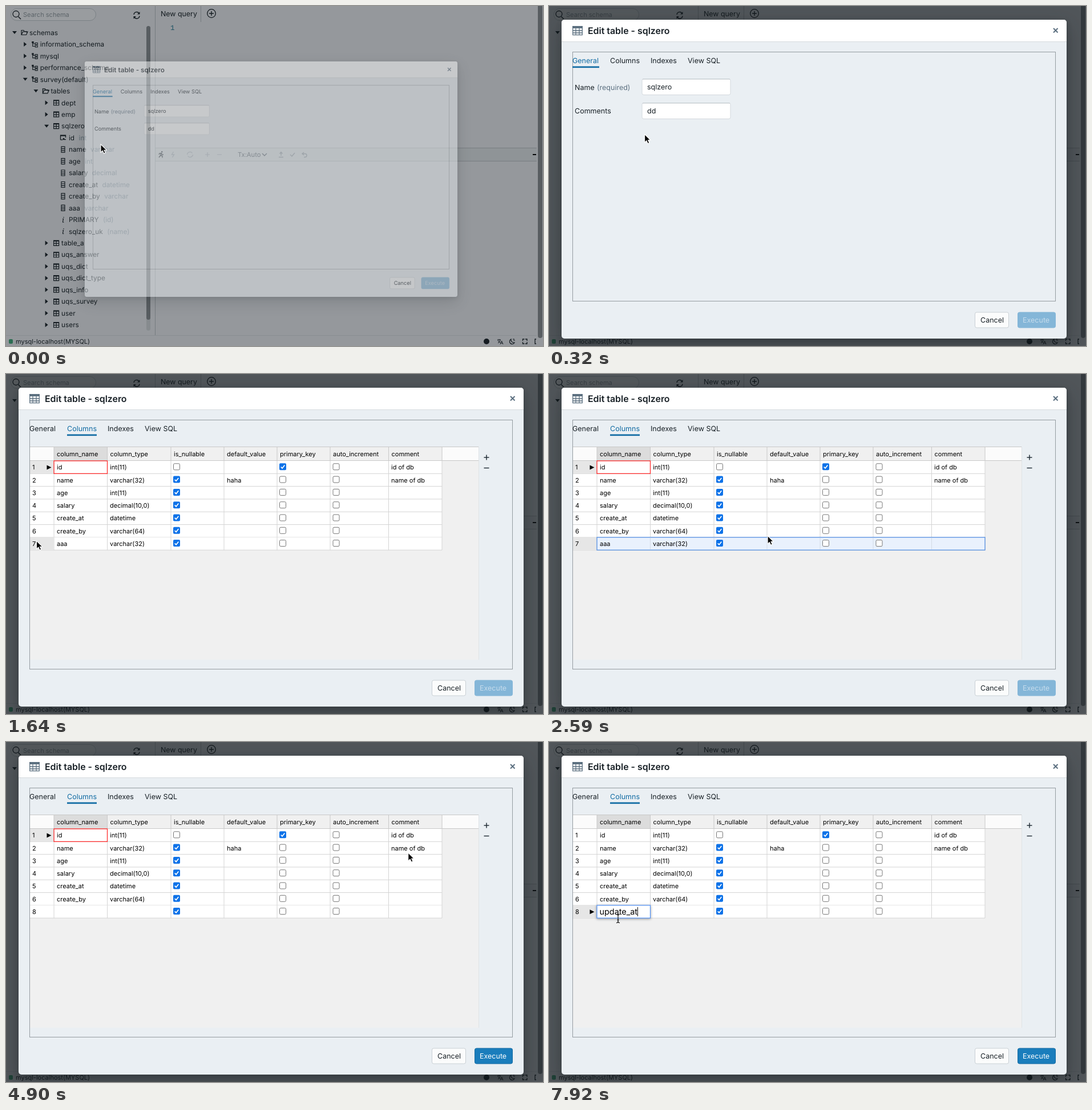
Write an HTML page that moves like this. It is 941 px wide and 595 px high and loops after 8 s.

```html
<!DOCTYPE html>
<html lang="en">
<head>
<meta charset="utf-8">
<title>Edit table</title>
<style>
html, body { margin: 0; width: 100%; height: 100%; overflow: hidden; background: #edf0f2; }
svg { display: block; width: 100vw; height: 100vh; }
text { font-family: Inter, "Open Sans", sans-serif; white-space: pre; text-rendering: geometricPrecision; }
#panel { filter: drop-shadow(0 3px 4px #10161a40) drop-shadow(0 12px 18px #10161a50); }
#editor rect { filter: drop-shadow(0 1px 2px #0006); }
</style>
</head>
<body>
<svg id="stage" viewBox="0 0 941 595" preserveAspectRatio="none"></svg>
<script>
const INK = '#182026', GREY = '#5c7080', BLUE = '#106ba3';

const text = (x, y, s, size = 12.5, fill = INK, more = '') =>
  `<text x="${x}" y="${y + size * 0.36}" font-size="${size}" fill="${fill}" ${more}>${s}</text>`;
const rect = (x, y, w, h, fill, more = '') =>
  `<rect x="${x}" y="${y}" width="${w}" height="${h}" fill="${fill}" ${more}/>`;
const line = (d, stroke = INK, width = 1, more = '') =>
  `<path d="${d}" fill="none" stroke="${stroke}" stroke-width="${width}" ${more}/>`;
const shape = (d, fill = INK) => `<path d="${d}" fill="${fill}"/>`;
const group = (id, body) => `<g id="${id}">${body}</g>`;

// ---- page behind the dialog ----
const icons = {
  folder: (x, y) => line(`M${x - 5} ${y + 4}V${y - 4}h4l1 2h4v2M${x - 5} ${y + 4}l2.500-5.500h8.500l-2.500 5.500z`, INK, 1.2),
  schema: (x, y) => line(`M${x - 4} ${y - 4}V${y + 3.5}H${x}M${x - 4} ${y - 1}H${x}`, INK, 1.1) +
    rect(x - 5.5, y - 5, 3.5, 3, INK) +
    [-2.5, 2].map(d => line(`M${x + 0.5} ${y + d}h4v3h-4z`, INK, 1.1)).join(''),
  table: (x, y) => line(`M${x - 4.5} ${y - 4.5}h9v9h-9zM${x - 4.5} ${y - 3.5}h9M${x - 4.5} ${y + 0.5}h9M${x} ${y - 4}v8`, INK, 1.2),
  key: (x, y) => line(`M${x - 4.5} ${y + 3.5}v-8h9v4M${x - 4.5} ${y - 3.5}h9M${x - 4.5} ${y + 3.5}h4M${x + 1} ${y + 3}h4`, INK, 1.3) +
    `<circle cx="${x + 1}" cy="${y + 2}" r="1.600" fill="${INK}"/>`,
  column: (x, y) => line(`M${x - 3} ${y - 5}h6v10h-6zM${x - 3} ${y - 1.5}h6M${x - 3} ${y + 1.8}h6`, INK, 1.2),
  index: (x, y) => text(x - 2, y, 'i', 13, INK, 'style="font-family:Noto Serif,serif" font-style="italic"')
};

function tree() {
  // level, icon, open, label, type
  const fold = (level, icon, names) => names.split(' ').map(n => [level, icon, false, n]);
  const col = (name, type, icon = 'column') => [4, icon, null, name, type];
  const rows = [
    [0, 'folder', true, 'schemas'],
    ...fold(1, 'schema', 'information_schema mysql performance_schema'),
    [1, 'schema', true, 'survey(default)'],
    [2, 'folder', true, 'tables'],
    ...fold(3, 'table', 'dept emp'),
    [3, 'table', true, 'sqlzero'],
    col('id', 'int', 'key'), col('name', 'varchar'), col('age', 'int'), col('salary', 'decimal'),
    col('create_at', 'datetime'), col('create_by', 'varchar'), col('aaa', 'varchar'),
    col('PRIMARY', '(id)', 'index'), col('sqlzero_uk', '(name)', 'index'),
    ...fold(3, 'table', 'table_a uqs_answer uqs_dict uqs_dict_type uqs_info uqs_survey user users')
  ];
  return rows.map(([level, icon, open, label, type], i) => {
    const y = 46.5 + 20.46 * i, x = 15 + 18.7 * level;
    const caret = open === null ? '' : open
      ? shape(`M${x - 4} ${y - 2.5}h8l-4 5z`)
      : shape(`M${x - 2.5} ${y - 4}v8l5-4z`);
    const tail = type ? `<tspan dx="7.500" fill="#8a9ba8">${type}</tspan>` : '';
    return caret + icons[icon](level === 4 ? 100 : x + 17, y) +
      text(level === 4 ? 110 : x + 26, y, label + tail, 11.8);
  }).join('');
}

const page =
  rect(0, 0, 941, 595, '#edf0f2') +
  rect(8.5, 4.5, 149, 21, '#f4f6f7', 'rx="10.500" stroke="#c2c9ce"') +
  line('M21.500 18.500l4.500 4.500', INK, 1.5) + `<circle cx="17.500" cy="14" r="5.500" fill="none" stroke="${INK}" stroke-width="1.300"/>` +
  text(30, 15, 'Search schema', 11.05, '#8f989e') +
  line('M224 15a5 5 0 0 1 9-2.500M234 17.500a5 5 0 0 1-9 2.500', INK, 1.4) +
  shape('M234.500 10v4.500h-4.500zM223.500 22.500v-4.500h4.500z') +
  tree() +
  rect(246, 35, 7, 533, '#d5d9dc', 'rx="3.500"') + rect(246, 35, 7, 514, '#888d90', 'rx="3.500"') +
  line('M261.500 0V576M341.500 0V28', '#b9bfc3') +
  text(271, 13.5, 'New query', 12.4) +
  `<circle cx="360" cy="13" r="7.300" fill="none" stroke="${INK}" stroke-width="1.300"/>` + line('M356 13h8M360 9v8', INK, 1.4) +
  text(288, 37.5, '1', 12.5, '#237893', 'style="font-family:Liberation Mono,monospace"') +
  rect(262, 248, 668, 23, '#e4e8eb') + line('M262 248.500H930M262 271.500H930', '#bdc3c7') +
  line('M923 260h6', '#000', 2) +
  line('M268 265l3-4 3 1.500v3M271 261l1-3.500-3 .500-1 2M272 258l2 2h2', INK, 1.4) + rect(272, 254, 2.5, 2.5, INK, 'rx="1"') +
  line('M293.500 255l-3 5h4l-3 5', '#a7b0b6', 1.4) +
  line('M317.500 260a5 5 0 0 1 9-2.500M327.500 260a5 5 0 0 1-9 2.500M349 260h8M353 256v8M370 260h8', '#a7b0b6', 1.2) +
  text(406, 260, 'Tx:Auto', 11.2, '#39444c') + line('M449 258l4 4 4-4', '#39444c', 1.4) +
  line('M478 264.500h8M482 262v-6M479.500 258.500l2.500-3 2.500 3M498 260l3 3 5-6M522 256l-3 2.500 3 2.500M519 258.500h5a3 3 0 0 1 0 6h-2', '#8a959c', 1.4) +
  rect(932, -6, 8, 587, '#888d90', 'rx="4"') +
  line('M0 576.500H930', '#d8dde0') +
  rect(5, 583, 7, 8, '#3fa878', 'rx="2"') + text(17, 587, 'mysql-localhost(MYSQL)', 11) +
  `<circle cx="842" cy="587" r="5" fill="${INK}"/>` +
  line('M861 584h6M864 583v1M862 590q4-2 4-6M862 585q1 3 4 4M866 592l2.500-6 2.500 6M867 590h3', INK, 1) +
  line('M885 583a4.500 4.500 0 1 0 6 6a5 5 0 0 1-6-6zM888 583h3M889 585h3', INK, 1.2) +
  line('M905.500 586v-3h3M910 583h3v3M913 588v3h-3M908.500 591h-3v-3M929 583h-2v8h2', INK, 1.3);

// ---- table grid ----
const EDGES = [42, 84, 177.5, 289, 382, 475, 568, 670.5, 764];
const TOP = 152, PITCH = 22.3;
const rowTop = i => TOP + PITCH * i;

function checkbox(x, y, on) {
  return on
    ? rect(x - 6, y - 6, 12, 12, '#0d72e8', 'rx="2"') + line(`M${x - 3.3} ${y + 0.2}l2.400 2.500 4.200-5.400`, '#fff', 1.7)
    : rect(x - 5.5, y - 5.5, 11, 11, '#fff', 'rx="2" stroke="#767676"');
}
function cells(i, num, name, type, nullable, value, key, comment) {
  const y = rowTop(i) + 11.3;
  const words = [[46, num], [89, name], [182, type], [387, value], [675, comment]];
  return words.map(([x, s]) => s ? text(x, y, s, 11, '#000') : '').join('') +
    checkbox(299, y - 1, nullable) + checkbox(485, y - 1, key) + checkbox(578.5, y - 1, false);
}
const backdrop = (i, n) => {
  const y = rowTop(i), h = PITCH * n;
  let d = '';
  for (let k = 1; k <= n; k++) d += `M42 ${y + PITCH * k}H764`;
  for (const x of EDGES.slice(1)) d += `M${x} ${y}v${h}`;
  return rect(42, y, 722, h, '#fff') + line(d, '#d4d4d4');
};
const head = i => rect(42, rowTop(i), 41.5, PITCH - 0.5, '#e6e6e6');
const marker = i => head(i) + shape(`M71.500 ${rowTop(i) + 7.5}v8l8-4z`, '#000');
const frame = (i, w, stroke, fill = 'none') =>
  rect(84, rowTop(i), w, PITCH, fill, `stroke="${stroke}" stroke-width="1.200"`);

const titles = ['column_name', 'column_type', 'is_nullable', 'default_value', 'primary_key', 'auto_increment', 'comment'];
const grid =
  rect(42, 127, 786, 373, '#f0f0f0') + line('M828.500 127V500', '#dfe3e6') +
  rect(42, 128, 786, 23.5, '#fbfbfb') + rect(84, 128, 680, 23.5, '#f0f0f0') + rect(84, 128, 93.5, 23.5, '#dcdcdc') +
  line('M42 127.500H828M42 151.500H828' + EDGES.slice(1).map(x => `M${x} 128v23`).join(''), '#c8c8c8') +
  titles.map((s, i) => text(EDGES[i + 1] + 5, 140, s, 11, '#000')).join('') +
  backdrop(0, 6) + group('last', backdrop(6, 1)) +
  group('first', marker(0)) + group('hover', head(6)) + group('added', marker(6)) +
  group('selected', frame(6, 680, '#4b89e0', '#e9f1fd') + line(EDGES.slice(2, 8).map(x => `M${x} ${rowTop(6) + 1}v20`).join(''), '#d4dbe6')) +
  cells(0, '1', 'id', 'int(11)', false, '', true, 'id of db') +
  cells(1, '2', 'name', 'varchar(32)', true, 'haha', false, 'name of db') +
  cells(2, '3', 'age', 'int(11)', true) +
  cells(3, '4', 'salary', 'decimal(10,0)', true) +
  cells(4, '5', 'create_at', 'datetime', true) +
  cells(5, '6', 'create_by', 'varchar(64)', true) +
  group('row7', cells(6, '7', 'aaa', 'varchar(32)', true)) +
  group('row8', cells(6, '8', '', '', true)) +
  group('red1', frame(0, 93.5, '#ff2020')) + group('red8', frame(6, 93.5, '#ff2020')) +
  group('editor', frame(6, 93.5, '#5292f7', '#fff') + text(88.5, 297, '', 14.4, '#000', 'id="typed"') +
    line('M0 289V305', '#000', 1, 'id="caret"')) +
  line('M837.500 146h9M842 141.500v9M837.500 164.500h9', '#25303a', 1.5);

// ---- dialog ----
const tabs = [[41, 'General'], [107, 'Columns'], [178, 'Indexes'], [243, 'View SQL']];
const input = (y, s) =>
  rect(163, y, 155, 28, '#fff', 'rx="3" stroke="#d3d9dd"') + line(`M164 ${y + 0.5}h153`, '#bfc6cb') + text(172, y + 14, s, 12.5);
const button = (x, w, fill, stroke, label, color, tx) =>
  rect(x + 0.5, 536, w, 27, fill, `rx="3" stroke="${stroke}"`) + text(tx, 549.5, label, 12.5, color);

const dialog =
  rect(22, 24, 885, 558, '#eaeff3', 'id="panel" rx="5"') +
  shape('M22 62V29a5 5 0 0 1 5-5H902a5 5 0 0 1 5 5V62z', '#fff') + line('M22 62.500H907', '#d5dadd') +
  rect(41, 35, 18, 4, GREY) + line('M41.700 35.700h16.600v15h-16.600zM41 43h18M41 47h18M47 39v12M53 39v12', GREY, 1.3) +
  text(68, 43.5, 'Edit table - sqlzero', 15.9, INK, 'font-weight="600"') +
  line('M884 39l7.500 7.500M891.500 39l-7.500 7.500', GREY, 2) +
  rect(41.5, 80.5, 846, 436, 'none', 'stroke="#959ca1"') +
  tabs.map(([x, s], i) => text(x, 95.5, s, 12.5, INK, `id="tab${i}"`)).join('') +
  rect(41, 105.5, 47, 2.7, BLUE, 'id="underline"') +
  group('general', text(45, 142, 'Name') + text(84, 142, '(required)', 12.5, GREY) + text(45, 183.5, 'Comments') +
    input(127.5, 'sqlzero') + input(169.5, 'dd')) +
  group('columns', grid) +
  button(746, 59, '#fbfcfc', '#c9d0d5', 'Cancel', INK, 756) +
  group('disabled', button(821, 66, '#84b6d8', '#84b6d8', 'Execute', '#c6dcec', 830)) +
  group('enabled', button(821, 66, '#1a7dbc', '#156ba2', 'Execute', '#fff', 830));

const pointer =
  group('arrow', '<path d="M0 0V14.200L3.300 11.200 5.600 16.200 8.200 15 6 10.200H10.300Z" fill="#000" stroke="#fff" stroke-width="1.100"/>') +
  group('beam', line('M118 301.500q3 0 3 2.500v10q0 2.500-3 2.500M124 301.500q-3 0-3 2.500M124 316.500q-3 0-3-2.500M119.500 311.500h3', '#000', 1.1));

document.getElementById('stage').innerHTML =
  page + rect(0, 0, 941, 595, '#10161a', 'id="shade"') + group('dialog', dialog) + pointer;

// ---- motion ----
const path = [
  [0, 166, 242], [86, 170, 243], [190, 171, 243], [330, 164, 205], [500, 142, 112], [580, 138, 98], [774, 138, 98],
  [860, 133, 180], [946, 129, 267], [1050, 112, 294], [1200, 84, 301], [1400, 62, 295], [1550, 54, 291], [1634, 53.5, 292],
  [1980, 53.5, 292], [2240, 150, 294], [2500, 330, 288], [2830, 549, 268], [3200, 690, 225], [3612, 829, 167],
  [3790, 840, 158], [4380, 840, 158], [4480, 858, 182], [4660, 841, 139], [4780, 841, 139],
  [4960, 640, 220], [5110, 380, 310], [5250, 220, 332], [5430, 121, 303]
];
const keys = [6560, 6770, 6855, 6940, 7110, 7170, 7470, 7740, 7920];
const HOLD = 86;

function place(time) {
  const t = Math.floor((time + 20) / HOLD) * HOLD;
  const i = path.findIndex(p => p[0] > t);
  if (i < 0) return path[path.length - 1].slice(1);
  const [a, b] = [path[i - 1], path[i]], k = (t - a[0]) / (b[0] - a[0]);
  return [a[1] + (b[1] - a[1]) * k, a[2] + (b[2] - a[2]) * k];
}

const el = id => document.getElementById(id);
const show = (id, on) => { el(id).style.display = on ? '' : 'none'; };

function draw(t) {
  const within = (a, b = 8000) => t >= a && t < b;
  const scale = t < 90 ? 0.738 : t < 230 ? 1.0136 : 1;
  el('shade').setAttribute('opacity', t < 90 ? 0.4 : 0.7);
  el('dialog').setAttribute('opacity', t < 90 ? 0.476 : 1);
  el('dialog').setAttribute('transform', `translate(464.5 303) scale(${scale}) translate(-464.5 -303)`);

  const grown = within(1030);
  show('general', !grown);
  show('columns', grown);
  el('tab0').setAttribute('fill', grown ? INK : BLUE);
  el('tab1').setAttribute('fill', within(490) ? BLUE : INK);
  el('underline').setAttribute('x', grown ? 107 : 41);
  el('underline').setAttribute('width', grown ? 52 : 47);

  const states = {
    first: [0, 5600], red1: [0, 5600], hover: [1550, 4050], selected: [1880, 4050], row7: [0, 4050],
    row8: [4810], added: [5600], red8: [5600, 5720], editor: [5720],
    disabled: [0, 4140], enabled: [4140], arrow: [0, 5600], beam: [5600]
  };
  for (const id in states) show(id, within(...states[id]));
  show('last', !within(4050, 4810));

  const typed = el('typed');
  typed.textContent = 'update_at'.slice(0, keys.filter(k => t >= k).length);
  show('caret', !within(6200, 6560));
  const width = within(6560) ? typed.getComputedTextLength() : 0;
  el('caret').setAttribute('transform', `translate(${88.8 + width} 0)`);
  el('arrow').setAttribute('transform', `translate(${place(t)})`);
}

const start = performance.now();
(function tick() {
  draw((performance.now() - start) % 8000);
  requestAnimationFrame(tick);
})();
</script>
</body>
</html>
```
